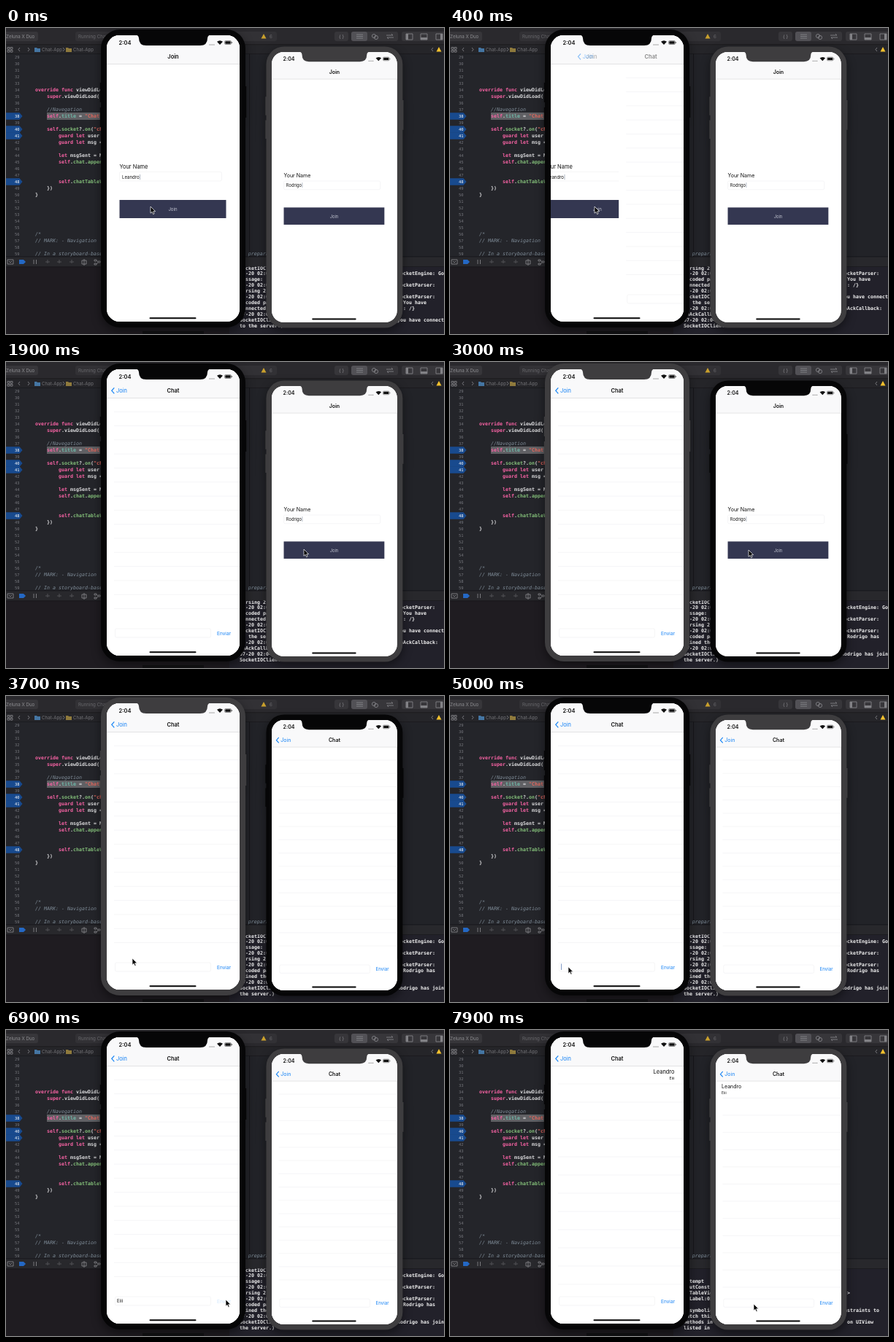
An HTML page that plays this animation: 600 by 420 pixels, repeating every 8 s.

```html
<!DOCTYPE html>
<html lang="pt">
<head>
<meta charset="utf-8">
<title>Chat demo</title>
<style>
html, body { margin: 0; width: 100%; height: 100%; overflow: hidden; background: #1f1c21; }
svg { display: block; width: 600px; height: 420px; }
text { font-family: Inter, Roboto, sans-serif; white-space: pre; }
.code text { font: bold 6.65px "DejaVu Sans Mono", "Liberation Mono", monospace; fill: #dcdcde; }
.code .num { font-size: 5.4px; font-weight: normal; fill: #75767c; text-anchor: end; }
.code .on { fill: #fff; }
.code .k { fill: #f763a4; }
.code .t { fill: #6fb8a8; }
.code .g { fill: #84c07a; }
.code .s { fill: #e8695f; }
.code .c { fill: #7f8c98; font-style: italic; font-weight: normal; }
.console text { font: bold 6.65px "DejaVu Sans Mono", "Liberation Mono", monospace; fill: #f4f4f4; }
.tool text { font-size: 6.2px; fill: #8d8d91; }
.icon { fill: none; stroke: #828286; stroke-width: .9; }
.bezel { filter: drop-shadow(0 5px 7px rgba(0, 0, 0, .45)); }
.phone text { font-size: 7.46px; fill: #111; }
.phone .bold { font-weight: 600; }
.phone .mid { text-anchor: middle; }
.phone .end { text-anchor: end; }
.phone .blue { fill: #1683f5; }
.phone .small { font-size: 6.1px; }
.field { fill: #fff; stroke: #eeeef0; stroke-width: .6; }
</style>
</head>
<body>
<svg viewBox="0 0 600 420">
  <defs>
    <clipPath id="screen"><rect width="182" height="393" rx="17.500"/></clipPath>
    <clipPath id="log"><rect x="306" y="327.500" width="294" height="93"/></clipPath>
  </defs>
  <rect width="600" height="420" fill="#1f1c21"/>
  <rect y="35" width="600" height="279" fill="#24252a"/>
  <rect x="334" y="35" width="266" height="279" fill="#222328"/>
  <path d="M333.500 24V314" stroke="#17171a"/>
  <g class="tool" id="tool"></g>
  <g class="code" id="code"></g>
  <rect x="187" y="416" width="84" height="4" fill="#121214"/>
  <rect x="306" y="328" width="294" height="92" fill="#22212a"/>
  <g class="console" id="console" clip-path="url(#log)"></g>
  <g id="phones"></g>
  <path id="cursor" d="M0 0V9.200L2.100 7.300L3.600 10.600L5.100 9.900L3.700 6.700H6.600Z" fill="#000" stroke="#fff" stroke-width=".7"/>
</svg>
<script>
const $ = id => document.getElementById(id);
const clamp = x => Math.max(0, Math.min(1, x));
const text = (x, y, s, cls = '') => `<text x="${x}" y="${y}" class="${cls}">${s}</text>`;
const rect = (x, y, w, h, fill, rx = 0) =>
  `<rect x="${x}" y="${y}" width="${w}" height="${h}" rx="${rx}" fill="${fill}"/>`;
const icon = d => `<path class="icon" d="${d}"/>`;
const W = 182;
const NAMES = ['Leandro', 'Rodrigo'];

function toolbar() {
  const pill = '#37363a';
  const warning = (x, y, fill) => `<path d="M${x} ${y}l3.500 6.500h-7z" fill="${fill}"/>`;
  const folder = (x, fill) => `<path d="M${x} 27h3l1 1h4v5h-8z" fill="${fill}"/>`;
  const panel = x => icon(`M${x} 8h9v8h-9z`);
  const steps = [57, 73, 90].map(x => icon(`M${x - 3} 321h6m-3 -3v5`)).join('');
  return rect(0, 0, 600, 23, '#2a292d') + rect(0, 23, 600, 12, '#252529') +
    rect(0, 22.5, 600, .7, '#151517') + rect(0, 35, 600, .6, '#17171a') +
    rect(-4, 5, 48, 13, pill, 3) + text(0, 14, 'Zeluna X Duo') +
    rect(95, 5, 276, 13, '#323135', 3) + '<g opacity=".6">' + text(99, 14, 'Running Chat-App') + '</g>' +
    warning(353, 8, '#c9a02c') + '<g opacity=".6">' + text(361, 14, '6') + '</g>' +
    rect(450, 5, 19, 13, pill, 3) + text(456, 14, '{ }') +
    rect(473, 5, 64, 13, pill, 3) + rect(473, 5, 22, 13, '#525156', 3) +
    icon('M480 9h9M480 11.500h9M480 14h9') +
    '<circle class="icon" cx="504" cy="11" r="2.600"/><circle class="icon" cx="507" cy="13" r="2.600"/>' +
    icon('M521 10h9l-2 -2M531 13h-9l2 2') +
    rect(542, 5, 62, 13, pill, 3) + panel(548) + panel(568) + panel(589) +
    rect(548, 8, 3, 8, '#828286') + rect(568, 13, 9, 3, '#828286') + rect(595, 8, 3, 8, '#828286') +
    icon('M2 26.500h3v2.500h-3zM6 26.500h3v2.500h-3zM2 30.500h3v2.500h-3zM6 30.500h3v2.500h-3z') +
    icon('M19 27l-2 2.500l2 2.500M30 27l2 2.500l-2 2.500M78 27l2 2.500l-2 2.500M585 27l-2 2.500l2 2.500') +
    folder(39, '#4576a3') + folder(82, '#8f7a3c') +
    '<g opacity=".75">' + text(49, 32, 'Chat-App') + text(92, 32, 'Chat-App') + '</g>' +
    warning(593, 26, '#f2c12e') +
    rect(0, 314, 600, 14, '#28282c') + rect(0, 313.6, 600, .7, '#111114') + rect(0, 327.5, 600, .7, '#111114') +
    icon('M2 318h8v6h-8zM4 320l2 2l2 -2') +
    '<path d="M18 318h6l3 3l-3 3h-6z" fill="#2468c4"/>' +
    icon('M38 318v6M41.500 318v6') + '<g opacity=".5">' + steps + '</g>' +
    icon('M104 319h6v5h-6zM107 317v9M121 318h3v2h-3zM126 320h3v2h-3zM121 323h3v2h-3zM124 319l2 2M124 324l2 -2');
}

function editor() {
  const y = n => 121 + (n - 38) * 9;
  const t = (cls, s) => `<tspan class="${cls}">${s}</tspan>`;
  const self = t('k', 'self');
  const guard = t('k', 'guard let');
  const lines = [
    [34, 0, t('k', 'override func') + ' viewDidLoad() {'],
    [35, 1, t('k', 'super') + '.viewDidLoad()'],
    [37, 1, t('c', '//Navegation')],
    [38, 1, self + '.' + t('t', 'title') + ' = ' + t('s', '"Chat"')],
    [40, 1, self + '.' + t('g', 'socket') + '?.' + t('g', 'on') + '(' + t('s', '"chat"')],
    [41, 2, guard + ' user ='],
    [42, 2, guard + ' msg ='],
    [44, 2, t('k', 'let') + ' msgSent = M'],
    [45, 2, self + '.' + t('g', 'chat') + '.' + t('g', 'append')],
    [48, 2, self + '.' + t('g', 'chatTableView')],
    [49, 1, '})'],
    [50, 0, '}'],
    [56, 0, t('c', '/*')],
    [57, 0, t('c', '// MARK: - Navigation')],
    [59, 0, t('c', '// In a storyboard-based application, you will often want to do a little preparation')]
  ];
  const stops = [38, 40, 41, 48];
  let out = rect(56, 116, 76, 10, '#606064');
  for (const n of stops)
    out += `<path d="M0 ${y(n) - 4.7}H18.500L22.500 ${y(n)}L18.500 ${y(n) + 4.7}H0Z" fill="#184a8e"/>`;
  for (let n = 29; n < 60; n++)
    out += text(18.5, y(n) + 2, n, stops.includes(n) ? 'num on' : 'num');
  for (const [n, indent, s] of lines) out += text(40 + indent * 16, y(n) + 2.2, s);
  return out;
}

// Each log line holds a left part and the part seen past the second phone.
const STAMP = '07-20 02:04:';
const joined = (who, left, right, said, last) => [
  ['SocketIOClient'], [STAMP, 'SocketEngine: Got'], ['message:'], [STAMP, 'SocketParser:'],
  ['parsing 2'], [STAMP, 'SocketParser:'], ['decoded packet', '  ' + who],
  [left, right], [STAMP], ['SocketIOClient', said], [last]
];
const start = joined('You have', 'connected to', '  : /}', 'you have connected', 'to the server.)');
const logs = [
  [0, start],
  [400, [...start.slice(4), [STAMP, 'OnAckCallback:'], ['OnAckCallback'], [STAMP], ['SocketIOClient']]],
  [2300, joined(NAMES[1] + ' has', 'joined the', '', NAMES[1] + ' has joined', 'the server.)')],
  [7100, [[], [], ['attempt'], ['youtConstraint'], ['UITableViewCell', '  >'], ['UILabel:0x7f'], [],
    ['a symbolic', 'onstraints to'], ['catch this'], ['methods in', '  on UIView'], ['listed in <UIKit']]]
];
const logMarkup = lines => lines.map(([left = '', right = ''], i) =>
  text(320, 331.5 + i * 7.9, left) + text(536, 331.5 + i * 7.9, right)).join('');

function rows(first, pitch) {
  let d = '';
  for (let y = first; y < 346; y += pitch) d += `M10 ${y}H${W}`;
  return `<path d="${d}" stroke="#efeff1" stroke-width=".6"/>`;
}

function phone(i, place) {
  const [x, align] = i ? [8.5, ''] : [169.5, 'end'];
  return `<g class="phone" transform="${place}">
    <g class="bezel" id="bezel${i}">
      <rect x="-8" y="-8" width="198" height="409" rx="26"/>
      <path d="M189 70h2.200v43h-2.200zM-9.200 65h2v27h-2zM-9.200 99h2v27h-2z"/>
    </g>
    <g clip-path="url(#screen)">
      ${rect(0, 0, W, 393, '#fff')}
      <g id="join${i}">
        ${rect(0, 0, W, 393, '#fff')}
        ${text(17.5, 182.5, 'Your Name')}
        <rect class="field" x="17.500" y="187.500" width="140" height="12.500" rx="2"/>
        ${text(21, 196.5, `${NAMES[i]}<tspan fill="#55657f">|</tspan>`, 'small')}
        ${rect(17.5, 226, 146, 25, '#343751')}
        <g id="press${i}"><text x="90.500" y="241" class="mid small" style="fill:#c3c6d2">Join</text></g>
      </g>
      <g id="chat${i}">
        ${rect(0, 0, W, 393, '#fff')}
        <g id="empty${i}">${rows(58.3, 19.3)}</g>
        <g id="full${i}">${rows(64, 25)}
          ${text(x, 50, NAMES[0], align)}
          <text x="${x}" y="58.300" class="${align}" style="font-size:5.300px">Eiii</text>
        </g>
        ${rect(0, 347, W, 46, '#fff')}
        <rect class="field" x="11.500" y="356" width="131" height="12" rx="2"/>
        <text id="draft${i}" x="14" y="364.400" class="small"></text>
        <rect id="caret${i}" x="14.300" y="357.500" width=".7" height="8.500" fill="#4d6fae"/>
        <g id="send${i}"><text x="160.500" y="364.500" class="mid blue" style="font-size:6.500px">Enviar</text></g>
      </g>
      ${rect(0, 0, W, 39, '#f9f9fa')}${rect(0, 39, W, .5, '#c6c6c9')}
      <g id="titleA${i}">${text(91, 31.7, 'Join', 'bold mid')}</g>
      <g id="titleB${i}">${text(91, 31.7, 'Chat', 'bold mid')}</g>
      <g id="back${i}">${text(13, 31.7, 'Join', 'blue')}
        <path d="M10.300 25.300L6.800 29.300L10.300 33.300" fill="none" stroke="#1683f5" stroke-width="1.200"/></g>
      ${text(25, 13, '2:04', 'bold mid')}
      <path d="M140.500 13h1M142.500 13h1M144.500 13h1M146.500 13h1" stroke="#555" stroke-width="1"/>
      <path d="M151 8.800q4 -3 8 0l-4 4.300z" fill="#111"/>
      <rect x="161.500" y="7.500" width="9" height="5" rx="1.300" fill="none" stroke="#555" stroke-width=".6"/>
      ${rect(162.3, 8.3, 7.4, 3.4, '#111', .6)}${rect(171, 9, .8, 2, '#555')}
      <path id="notch${i}" d="M39 -1H143Q138 0 138 4Q138 14 128 14H54Q44 14 44 4Q44 0 39 -1Z"/>
      ${rect(58.5, 387.2, 64, 2.1, '#050505', 1)}
    </g>
  </g>`;
}

// Time, x, y of the pointer tip.
const path = [[0, 198, 245], [800, 198, 245], [1300, 408, 257], [2200, 408, 257], [2500, 409, 258],
  [3200, 409, 258], [3700, 173, 360], [4200, 162, 372], [6300, 162, 371], [6800, 301, 370],
  [7200, 301, 370], [7800, 416, 376], [8000, 416, 376]];

function pointer(t) {
  const k = path.findIndex(p => p[0] > t);
  const [a, b] = [path[k - 1], path[k]];
  const u = (t - a[0]) / (b[0] - a[0]);
  const e = u * u * (3 - 2 * u);
  return [a[1] + (b[1] - a[1]) * e, a[2] + (b[2] - a[2]) * e];
}

const set = (id, name, value) => $(id).setAttribute(name, value);
const shift = (id, x) => set(id, 'transform', `translate(${x} 0)`);
const show = (id, on) => set(id, 'opacity', +on);
const pushAt = [300, 3000];
let shownLog = -1;

function draw(t) {
  const focus = t >= 2200 && t < 4200 ? 1 : 0;
  const sent = t >= 7100;
  for (const i of [0, 1]) {
    const p = 1 - (1 - clamp((t - pushAt[i]) / 500)) ** 3;
    shift('join' + i, -W * .3 * p);
    shift('chat' + i, W * (1 - p));
    shift('titleA' + i, -72 * p);
    show('titleA' + i, clamp(1 - p * 1.5));
    shift('titleB' + i, 90 * (1 - p));
    show('titleB' + i, p);
    shift('back' + i, 60 * (1 - p));
    show('back' + i, p);
    show('press' + i, t >= pushAt[i] - 100 && t < pushAt[i] ? .4 : 1);
    show('empty' + i, !sent);
    show('full' + i, sent);
    const shade = i === focus ? '#060607' : '#3e3d3f';
    set('bezel' + i, 'fill', shade);
    set('notch' + i, 'fill', shade);
  }
  const typed = sent ? 0 : Math.floor(clamp((t - 5300) / 800) * 4);
  $('draft0').textContent = 'Eiii'.slice(0, typed);
  show('caret0', t >= 4600 && !typed && !sent);
  show('caret1', false);
  show('send0', t >= 6800 && !sent ? .2 : 1);
  const n = logs.filter(l => l[0] <= t).length - 1;
  if (n !== shownLog) {
    $('console').innerHTML = logMarkup(logs[n][1]);
    shownLog = n;
  }
  set('cursor', 'transform', `translate(${pointer(t)})`);
}

$('tool').innerHTML = toolbar();
$('code').innerHTML = editor();
$('phones').innerHTML = phone(1, 'translate(364 33) scale(.944)') + phone(0, 'translate(138 10)');

const begin = performance.now();
function tick() {
  const t = (performance.now() - begin) % 8000;
  draw(Math.floor(t / 100) * 100);
  requestAnimationFrame(tick);
}
tick();
</script>
</body>
</html>
```
